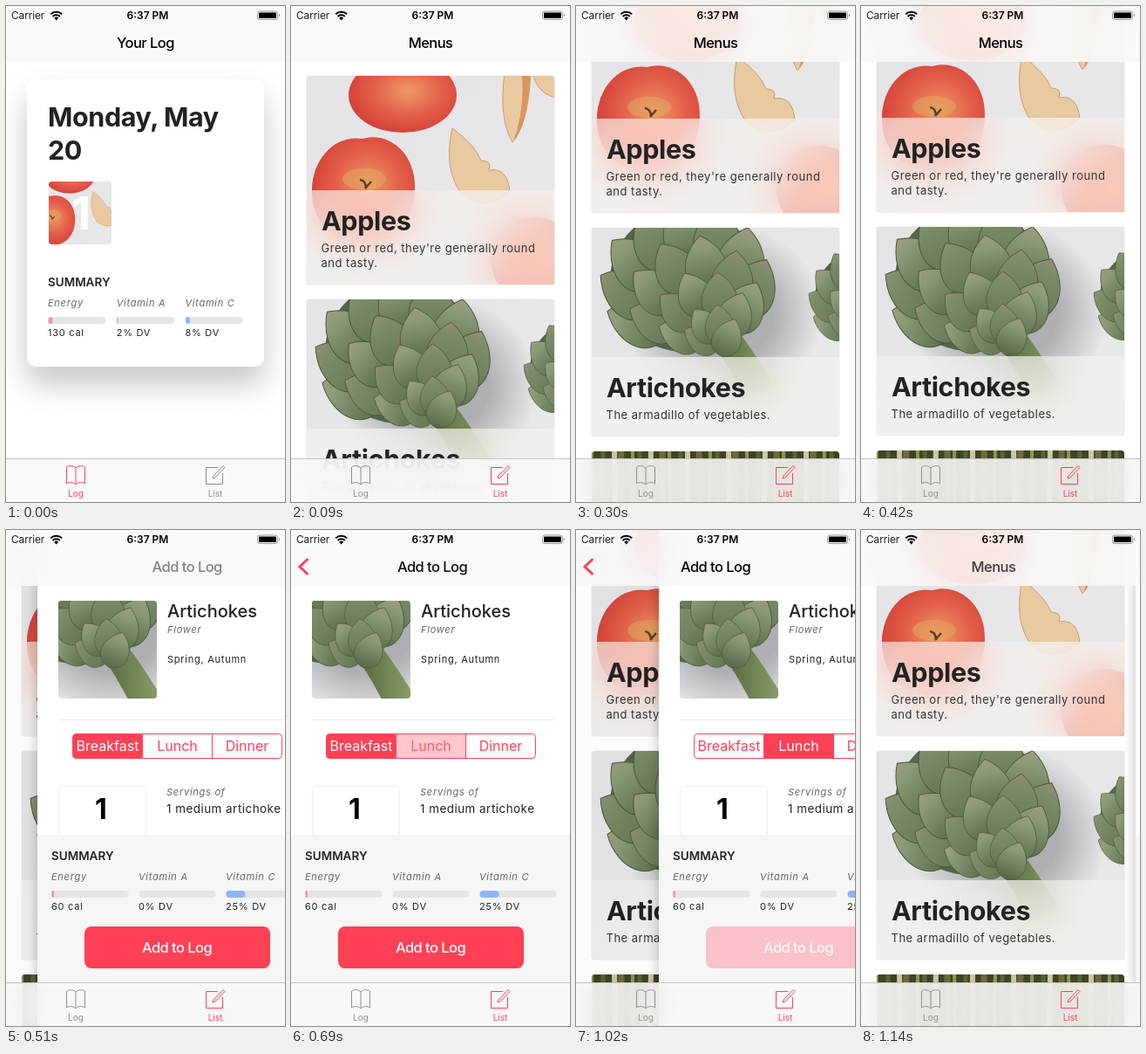
An HTML page that plays this animation: 320x568 px, repeating every 1170 ms.

```html
<!DOCTYPE html>
<html lang="en">
<meta charset="utf-8">
<title>Food log</title>
<style>
  html, body { margin: 0; width: 100%; height: 100%; overflow: hidden; background: #fff; }
  #stage { position: relative; width: 320px; height: 568px; overflow: hidden; }
  #stage > *, .card > * { position: absolute; left: 0; top: 0; }
  svg { display: block; overflow: hidden; font-family: Inter, Roboto, sans-serif; fill: #222; }
  #list { width: 320px; height: 568px; background: #fff; overflow: hidden; }
  #log, #panel { background: #fff; }
  #panel { box-shadow: 0 0 14px rgba(0, 0, 0, .25); }
  #dim { width: 320px; height: 568px; background: #000; }
  .card { position: absolute; left: 18px; width: 284px; height: 239px; border-radius: 4px; overflow: hidden; box-shadow: 0 0 1px #999; }
  .card .glass { top: auto; bottom: 0; width: 284px; background: rgba(246, 243, 239, .66); backdrop-filter: blur(24px) saturate(1.3); }
  .bar { width: 320px; background: rgba(249, 249, 249, .88); backdrop-filter: blur(20px) saturate(1.3); }
  #stage > #tabs { top: 518px; height: 50px; }
  .big { font-size: 30.5px; font-weight: 700; letter-spacing: -.4px; }
  .body { font-size: 13px; letter-spacing: .5px; fill: #333; }
  .nav { font-size: 16.5px; font-weight: 500; letter-spacing: -.55px; text-anchor: middle; fill: #000; }
  .sum { font-size: 13.5px; font-weight: 600; }
  .label, .value { font-size: 11px; letter-spacing: .75px; }
  .label { font-style: italic; fill: #666; }
  .seg { font-size: 16px; text-anchor: middle; }
  .tab { font-size: 10px; text-anchor: middle; stroke: none; }
</style>
<body>
<div id="stage">
  <svg width="0" height="0">
    <defs>
      <linearGradient id="cloth" x2="1" y2="1"><stop stop-color="#e2e2e6"/><stop offset="1" stop-color="#ebebed"/></linearGradient>
      <linearGradient id="leaf0"><stop stop-color="#566847"/><stop offset=".8" stop-color="#8d9c77"/><stop offset="1" stop-color="#a09a7f"/></linearGradient>
      <linearGradient id="leaf1"><stop stop-color="#627551"/><stop offset=".8" stop-color="#7d8d69"/><stop offset="1" stop-color="#968d76"/></linearGradient>
      <linearGradient id="stem" x2="1" y2="0"><stop stop-color="#4f6338"/><stop offset="1" stop-color="#8fa06c"/></linearGradient>
      <radialGradient id="skin" cx=".55" cy=".45" r=".62"><stop stop-color="#ee9a68"/><stop offset=".5" stop-color="#e4604a"/><stop offset="1" stop-color="#d03c35"/></radialGradient>
      <radialGradient id="shade"><stop offset=".5" stop-color="#77777c" stop-opacity=".5"/><stop offset="1" stop-color="#77777c" stop-opacity="0"/></radialGradient>
      <g id="bulb"></g>
      <g id="artichoke">
        <rect x="-100" y="-100" width="500" height="450" fill="url(#cloth)"/>
        <ellipse cx="150" cy="100" rx="115" ry="105" fill="url(#shade)"/>
        <path d="M134 128Q152 148 176 196L212 184Q186 142 172 124Z" fill="url(#stem)"/>
        <use href="#bulb" x="150" y="140"/>
        <use href="#bulb" transform="translate(340 131) scale(.65)"/>
      </g>
      <g id="apple">
        <rect x="-100" y="-100" width="500" height="450" fill="url(#cloth)"/>
        <g fill="url(#skin)">
          <ellipse cx="110" cy="22" rx="62" ry="43"/>
          <path d="M64 72C95 63 126 90 124 130C123 168 100 193 65 191C28 192 5 165 6 130C7 95 32 67 64 72Z"/>
          <circle cx="262" cy="212" r="50"/>
        </g>
        <ellipse cx="66" cy="118" rx="25" ry="12" fill="#e3a45c" opacity=".6"/>
        <path d="M61 119q7 1 7 10M67 129l7 -8" fill="none" stroke="#5a4028" stroke-width="2.5"/>
        <g fill="#e8c9a0" stroke="#d49a6c">
          <path d="M167 60Q157 105 176 133Q204 158 233 132Q230 104 209 108Q213 97 200 97Q194 80 167 60Z"/>
          <path d="M227 -4Q220 50 236 76Q254 56 257 -4Z"/>
          <path d="M259 -4Q264 22 290 26V-4Z"/>
        </g>
        <path d="M247 0Q250 40 237 75Q254 56 257 -4Z" fill="#d9965c"/>
      </g>
      <g id="asparagus"></g>
      <clipPath id="logClip"><rect x="49" y="201" width="72" height="72" rx="4"/></clipPath>
      <clipPath id="itemClip"><rect x="24" y="81" width="113" height="112" rx="4"/></clipPath>
    </defs>
  </svg>

  <div id="list"></div>
  <div id="dim"></div>

  <svg id="log" width="320" height="568">
    <rect x="24" y="84" width="272" height="329" rx="10" fill="#fff" style="filter:drop-shadow(0 20px 17px rgba(0,0,0,.22))"/>
    <g class="big"><text x="48" y="138">Monday, May</text><text x="48" y="176">20</text></g>
    <g clip-path="url(#logClip)"><use href="#apple" transform="translate(21 184) scale(.47)"/></g>
    <text x="86" y="256" text-anchor="middle" font-size="52" font-weight="700" fill="#fff">1</text>
    <g id="logSummary"></g>
  </svg>

  <svg id="panel" width="320" height="568">
    <g clip-path="url(#itemClip)"><use href="#artichoke" transform="translate(-58 18) scale(.95)"/></g>
    <text x="149" y="100" font-size="20" font-weight="500">Artichokes</text>
    <text class="label" x="149" y="118">Flower</text>
    <text class="value" x="149" y="152">Spring, Autumn</text>
    <path d="M24 217.5H302" stroke="#ebebeb"/>
    <g id="segments"></g>
    <rect x="40.5" y="233.5" width="240" height="28" rx="4" fill="none" stroke="#ff4055"/>
    <path d="M120.5 234v27M200.5 234v27" stroke="#ff4055"/>
    <rect x="24.5" y="293.5" width="100" height="80" rx="4" fill="#fff" stroke="#eee"/>
    <text x="73" y="331" text-anchor="middle" font-size="32" font-weight="700" fill="#000">1</text>
    <text class="label" x="148" y="304">Servings of</text>
    <text x="148" y="324" font-size="13.4" letter-spacing=".5">1 medium artichoke</text>
    <rect y="349" width="320" height="219" fill="#f6f6f6"/>
    <g id="itemSummary"></g>
    <g id="button">
      <rect x="54" y="454" width="213" height="48" rx="8" fill="#ff4055"/>
      <text class="nav" x="160" y="484" style="fill:#fff">Add to Log</text>
    </g>
  </svg>

  <div class="bar">
    <svg width="320" height="64">
      <text x="6" y="15" font-size="12" letter-spacing="-.15">Carrier</text>
      <g fill="none" stroke="#000" stroke-width="2">
        <path d="M51.2 9.4a9.2 9.2 0 0 1 13 0M53.6 12a5.8 5.8 0 0 1 8.2 0"/>
        <path d="M57.7 16.4l-2.4-2.6a3.4 3.4 0 0 1 4.8 0z" fill="#000" stroke="none"/>
      </g>
      <text x="162.5" y="15" font-size="12" font-weight="600" text-anchor="middle" fill="#000">6:37 PM</text>
      <rect x="288.5" y="6" width="23" height="9.5" rx="2.5" fill="none" stroke="#999"/>
      <rect x="290" y="7.5" width="20" height="6.5" rx="1" fill="#000"/>
      <path d="M313 9q2 1.7 0 3.5z" fill="#888"/>
      <path id="back" d="M19.5 33L10 42L19.5 51" fill="none" stroke="#ff4055" stroke-width="3"/>
      <text class="nav" id="logTitle" x="160" y="48">Your Log</text>
      <text class="nav" id="listTitle" x="160" y="48">Menus</text>
      <text class="nav" id="itemTitle" x="160" y="48">Add to Log</text>
    </svg>
  </div>
  <div class="bar" id="tabs">
    <svg width="320" height="50" fill="none">
      <path d="M0 .5H320" stroke="#c4c4c4"/>
      <g id="logTab">
        <path fill="none" d="M80 11C77 8 72 8 69.5 10V29C72 27 77 27 80 30C83 27 88 27 90.5 29V10C88 8 83 8 80 11V30"/>
        <text class="tab" x="80" y="44">Log</text>
      </g>
      <g id="listTab">
        <path fill="none" d="M243 10.5H229.5V29.5H248.5V17M237 23L238 20L249 8.5L251 10.5L240 22Z"/>
        <text class="tab" x="240" y="44">List</text>
      </g>
    </svg>
  </div>
</div>

<script>
const LOOP = 1170, STEP = 30, W = 320;
const LIST_AT = 60, PUSH_AT = 441, POP_AT = 1009;
const RED = '#ff4055', GRAY = '#8e8e93';
const $ = id => document.getElementById(id);
const clamp = v => Math.max(0, Math.min(1, v));
const smooth = v => (v = clamp(v)) * v * (3 - 2 * v);
const decay = (dt, tau) => Math.exp(-Math.max(0, dt) / tau);
const repeat = (n, make) => Array.from({ length: n }, (_, i) => make(i)).join('');

// Leaf tips lie on ellipses that shrink towards the stem at 0,0.
function leaf(row, i, count) {
  const phi = (150 + 215 * (i + .25 + row % 2 * .25) / count) * Math.PI / 180;
  const reach = 1 - row * .23, size = 1 - row * .13;
  const x = reach * (-43 + 97 * Math.cos(phi)), y = reach * (-80 + 90 * Math.sin(phi));
  const angle = Math.atan2(y, x) * 180 / Math.PI;
  return `<path d="M-74 0C-68 -38 -24 -36 0 0C-24 36 -68 38 -74 0" fill="url(#leaf${(row + i) % 2})" stroke="#48563b"
    transform="translate(${x} ${y}) rotate(${angle}) scale(${size})"/>`;
}
$('bulb').innerHTML = '<ellipse cx="-43" cy="-80" rx="86" ry="82" fill="#53654a"/>' +
  [8, 6, 5, 4].map((n, row) => repeat(n, i => leaf(row, i, n))).join('');

$('asparagus').innerHTML = '<rect width="284" height="239" fill="#3f4226"/>' + repeat(26, i =>
  `<path d="M${i * 11 + i * 7 % 5} -4l${i % 3 * 4 - 4} 245" stroke="${['#8f9650', '#566530', '#c9c7a4', '#6f6a3c'][i % 4]}" stroke-width="${4 + i * 5 % 4}"/>`);

const foods = [
  ['apple', 'Apples', ["Green or red, they're generally round", 'and tasty.']],
  ['artichoke', 'Artichokes', ['The armadillo of vegetables.']],
  ['asparagus', 'Asparagus', ['Green spears of spring.']],
];
$('list').innerHTML = foods.map(([photo, name, lines]) => {
  const h = 74 + 17 * lines.length;
  return `<div class="card"><svg width="284" height="239"><use href="#${photo}"/></svg>
    <div class="glass" style="height:${h}px"><svg width="284" height="${h}"><text class="big" x="17" y="46">${name}</text>
    ${lines.map((s, i) => `<text class="body" x="16.5" y="${70.5 + 17 * i}">${s}</text>`).join('')}</svg></div></div>`;
}).join('');
const cards = [...document.querySelectorAll('.card')];

function summary(id, x, y, pitch, width, values, fills) {
  const names = ['Energy', 'Vitamin A', 'Vitamin C'], colors = ['#f294a0', '#aaa', '#8fb4fb'];
  $(id).innerHTML = `<text class="sum" x="${x}" y="${y}">SUMMARY</text>` + repeat(3, i => {
    const left = x + .5 + pitch * i, bar = (w, color, r) =>
      `<rect x="${left}" y="${y + 35}" width="${w}" height="8" rx="${r}" fill="${color}"/>`;
    return `<text class="label" x="${left - .5}" y="${y + 23}">${names[i]}</text>` +
      bar(width, '#e5e5e6', 4) + bar(fills[i], colors[i], Math.min(4, fills[i] / 2)) +
      `<text class="value" x="${left - .5}" y="${y + 57}">${values[i]}</text>`;
  });
}
summary('logSummary', 48, 321, 78.7, 66, ['130 cal', '2% DV', '8% DV'], [5, 1, 5]);
summary('itemSummary', 16, 378, 100, 88, ['60 cal', '0% DV', '25% DV'], [2.5, 0, 22]);

$('segments').innerHTML = ['Breakfast', 'Lunch', 'Dinner'].map((s, i) =>
  `<rect x="${40.5 + 80 * i}" y="233.5" width="80" height="28" rx="${i ? 0 : 4}"/><text class="seg" x="${80.5 + 80 * i}" y="253">${s}</text>`).join('');
const segments = [...$('segments').querySelectorAll('rect')];

function setTitle(id, dx, opacity) {
  $(id).setAttribute('transform', `translate(${dx} 0)`);
  $(id).setAttribute('opacity', opacity);
}

function render(t) {
  const onLog = t < LIST_AT, push = t - PUSH_AT, pop = t - POP_AT;
  $('log').style.display = onLog ? '' : 'none';
  $('logTab').setAttribute('style', `stroke:${onLog ? RED : GRAY};fill:${onLog ? RED : GRAY}`);
  $('listTab').setAttribute('style', `stroke:${onLog ? GRAY : RED};fill:${onLog ? GRAY : RED}`);

  const scroll = 83 * smooth((t - 120) / 192);
  cards.forEach((card, i) => card.style.top = Math.round(80 + 256 * i - scroll) + 'px');

  const shown = push >= 0, popping = pop >= 0;
  const x = Math.round(W * (popping ? 1 - decay(pop, 31.4) : decay(push, 31.4)));
  $('panel').style.display = shown ? '' : 'none';
  $('panel').style.transform = `translateX(${x}px)`;
  $('dim').style.opacity = shown ? .02 * (1 - x / W) : 0;

  // The incoming title slides in late while the outgoing one fades quickly.
  const dt = popping ? pop : push;
  const fadeIn = 1 - decay(dt - 15, 85), fadeOut = clamp(1.4 - dt / 40);
  const enter = decay(dt, 57), leave = 1 - decay(dt - 20, 57);
  setTitle('logTitle', 0, onLog ? 1 : 0);
  if (popping) {
    setTitle('listTitle', -80 * enter, fadeIn);
    setTitle('itemTitle', 160 * leave, fadeOut);
  } else {
    setTitle('listTitle', shown ? -80 * leave : 0, onLog ? 0 : shown ? fadeOut : 1);
    setTitle('itemTitle', 160 * enter, shown ? fadeIn : 0);
  }
  $('back').setAttribute('opacity', popping ? clamp(1.3 - pop / 60) : clamp((push - 70) / 80));

  const selected = t < 720 ? 0 : 1, pressed = t >= 660 && t < 720;
  segments.forEach((rect, i) => {
    const on = i === selected, touch = pressed && i === 1;
    rect.style.fill = on ? RED : touch ? '#ffc8ce' : '#fff';
    rect.nextSibling.style.fill = on ? '#fff' : RED;
    rect.nextSibling.style.opacity = touch ? .8 : 1;
  });
  $('button').setAttribute('opacity', t >= 990 ? .28 : 1);
}

function tick() {
  const t = performance.now() % LOOP;
  render(Math.floor(t / STEP) * STEP);
  requestAnimationFrame(tick);
}
tick();
</script>
</body>
</html>
```
